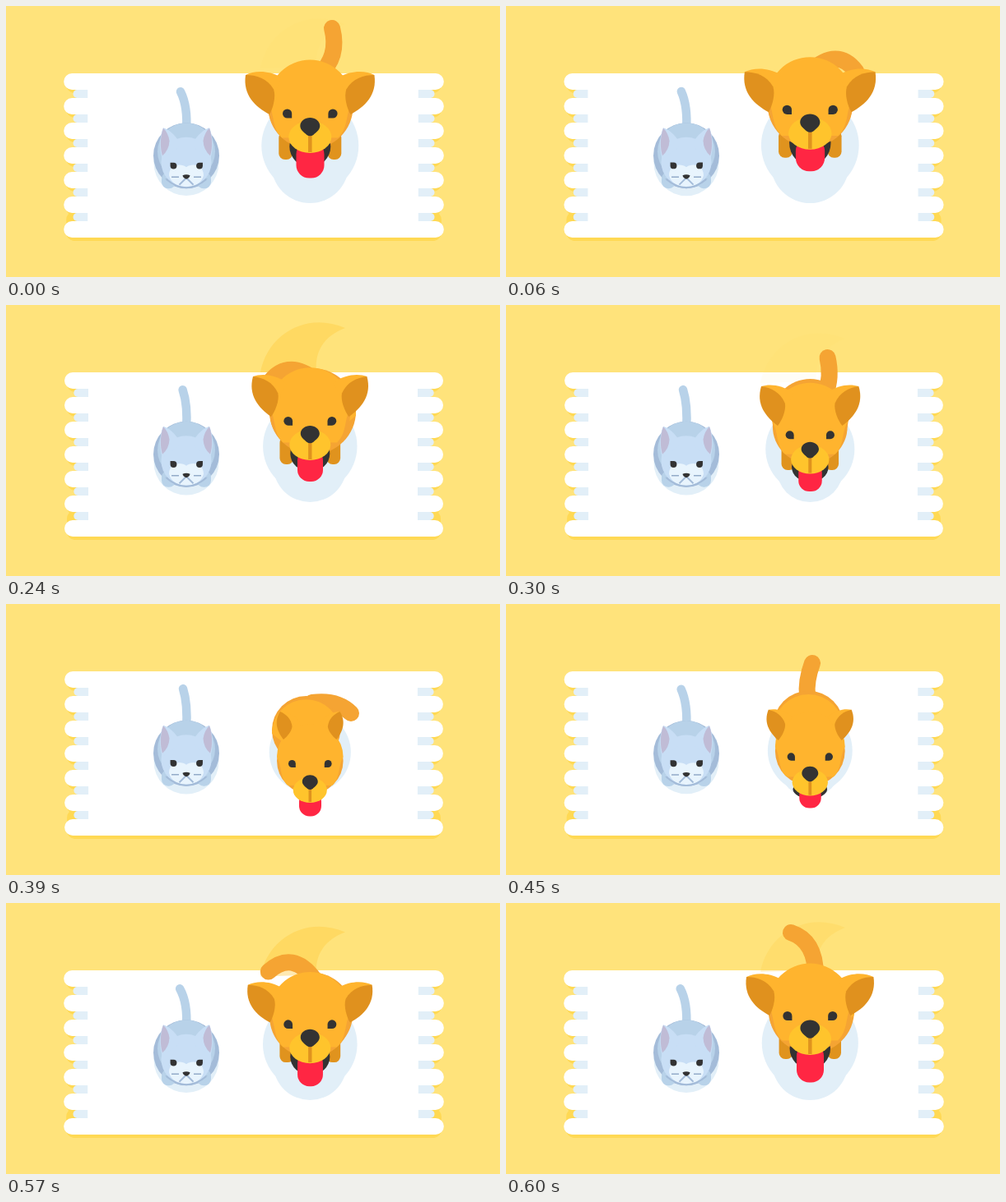
Animation, 600 px wide and 330 px high, one loop 0.63 s. Source, as an HTML page:

```html
<!DOCTYPE html>
<html lang="en">
<head>
<meta charset="utf-8">
<title>Cat and jumping dog</title>
<style>
html, body { margin: 0; width: 100%; height: 100%; overflow: hidden; background: #ffe37b; }
svg { display: block; width: 100vw; height: 100vh; }
</style>
</head>
<body>
<svg viewBox="0 0 600 330">
  <defs>
    <path id="eye" d="M-5.6 0A5.6 5.6 0 0 1 5.6 0V5.6H0A5.6 5.6 0 0 1 -5.6 0Z" fill="#333"/>
    <g id="catEar">
      <path d="M191 148C186 160 186 174 190 186L210 172 209 163C204 156 198 150 191 148Z" fill="#c8def5"/>
      <path d="M191 148.5C187 160 187 172 190 182Q198 175 198.500 164Q197 154 191 148.500Z" fill="#c0bcd6"/>
    </g>
    <path id="trail" d="M309 82C318 35 365 8 412 28C385 38 375 58 377 80Z" fill="#ffc93c"/>
    <g id="ear">
      <path d="M1 0C.98 .2 .86 .46 .55 .64L.35 .36Z" fill="#ffb42e"/>
      <path d="M1 0C.88 .2 .7 .36 .42 .36C.25 .32 .08 .14 0 0C.3 -.18 .66 -.28 1 0Z" fill="#e0911e"/>
    </g>
  </defs>

  <rect width="600" height="330" fill="#ffe37b"/>
  <g id="rug"></g>

  <circle id="catShade" cx="219" cy="192" r="39.5" fill="#e2eff8"/>
  <path id="catTail" fill="none" stroke="#b8d2e9" stroke-width="10.5" stroke-linecap="round"/>
  <g id="cat">
    <circle cx="219" cy="182" r="40" fill="#a4bcd9"/>
    <circle cx="219" cy="177" r="35" fill="#b8d2e9"/>
    <rect x="189" y="202" width="17" height="20" rx="8" fill="#b8d2e9"/>
    <rect x="232" y="202" width="17" height="20" rx="8" fill="#b8d2e9"/>
    <path d="M193 210Q219 233 245 210" fill="#a4bcd9"/>
    <circle cx="219" cy="190" r="30.500" fill="#c8def5"/>
    <use href="#catEar"/>
    <use href="#catEar" transform="translate(438) scale(-1 1)"/>
    <path d="M198 206C198 192 213 191 219 196C225 191 240 192 240 206C238 215 229 220 219 220S200 215 198 206Z" fill="#e8f4fd"/>
    <path d="M219 209L210.500 217.500M219 209L227.500 217.500" stroke="#a4bcd9" stroke-width="2"/>
    <path d="M195 211Q219 231 243 211" fill="none" stroke="#a4bcd9" stroke-width="2"/>
    <path d="M201 208H210M228 208H237" stroke="#93abc9" stroke-width="1.500"/>
    <path d="M214.500 206Q219 204 223.500 206Q223 209 219 210.500Q215 209 214.500 206Z" fill="#333"/>
    <use href="#eye" transform="translate(203.500 194.300) scale(-.7 -.7)"/>
    <use href="#eye" transform="translate(235 194.300) scale(.7 -.7)"/>
  </g>

  <g fill="#e2eff8">
    <circle id="shadeBig" cx="369.300"/>
    <circle id="shadeLow" cx="369.300"/>
  </g>
  <use id="trailL" href="#trail"/>
  <use id="trailR" href="#trail"/>
  <path id="tail" fill="none" stroke="#f5a433" stroke-width="20" stroke-linecap="round"/>
  <g fill="#e0931e">
    <rect id="legL" width="17" height="34" rx="7.500"/>
    <rect id="legR" width="17" height="34" rx="7.500"/>
  </g>
  <circle id="body" fill="#f5a433"/>
  <path id="back" fill="#ffb42e"/>
  <ellipse id="mouth" cx="369.300" fill="#333"/>
  <rect id="tongue" fill="#ff2643"/>
  <g id="head">
    <circle r="51" fill="#f5a433"/>
    <path d="M-51 -6A51 51 0 0 1 51 -6C43 8 47 26 34 38H-34C-47 26 -43 8 -51 -6Z" fill="#ffb42e"/>
  </g>
  <use id="earL" href="#ear"/>
  <g transform="translate(738.400) scale(-1 1)"><use id="earR" href="#ear"/></g>
  <g id="muzzle">
    <ellipse cy="-19.500" rx="26" ry="19.500" fill="#ffc42c"/>
    <path d="M0 -24V-1" stroke="#e0931e" stroke-width="4.500"/>
  </g>
  <use id="eyeL" href="#eye"/>
  <use id="eyeR" href="#eye"/>
  <path id="nose" d="M-12 -1C-12 -7 -6 -11 0 -11S12 -7 12 -1C12 4 7 7 4 10Q0 12.500 -4 10C-7 7 -12 4 -12 -1Z" fill="#333"/>
</svg>
<script>
const LOOP = 630, STEP = 30, MID = 369.3;

// time, body top, body x, body radius, leg bottom, rug inset, cat tail tip x
const bodyKeys = [
  [0, 71, 370, 51.5, 187, 0, 212],
  [150, 68, 369.3, 52, 184, .6, 214],
  [240, 77, 372.5, 52.5, 194, .8, 214.6],
  [300, 90, 369.5, 46.5, 201, .9, 215],
  [390, 112, 364.5, 41.5, 200, .9, 215],
  [510, 94, 371, 45.5, 201, 0, 210.5],
  [600, 79, 371, 52, 190, 0, 211.7]
];
// time, head y, scale, eye y, nose y, chin y, tongue bottom, tongue width, jaw drop
const faceKeys = [
  [0, 122.5, 1, 131, 147, 179, 209.5, 34, 17],
  [150, 119.5, 1.01, 124, 140.5, 173, 195, 36, 21],
  [240, 131, .96, 141.3, 157.5, 189, 215, 31, 14],
  [300, 148, .89, 158.3, 176.5, 205.5, 227, 28.5, 10],
  [390, 191, .79, 194.5, 217, 242, 258.5, 27, 0],
  [510, 157, .9, 168, 186.5, 215.5, 232, 27, 9],
  [600, 130, .99, 137.5, 153.5, 185, 218.5, 33, 17]
];
// time, left ear tip x y, root x y
const earKeys = [
  [0, 291, 84, 320, 132],
  [150, 290, 78, 318, 128],
  [240, 300, 87, 322, 136],
  [300, 310, 99, 330, 147],
  [390, 333, 131, 337, 165],
  [510, 300, 118, 323, 161],
  [600, 292, 90, 320, 137]
];
// time, tail root x y, bend x y, tip x y
const tailKeys = [
  [0, 380, 84, 405, 62, 396, 27],
  [75, 366, 80, 400, 46, 426, 84],
  [112, 366, 78, 386, 50, 388, 19],
  [150, 362, 82, 338, 58, 346, 30],
  [195, 364, 82, 326, 58, 306, 60],
  [240, 376, 92, 340, 62, 316, 100],
  [270, 384, 98, 366, 70, 342, 64],
  [300, 388, 108, 396, 88, 390.5, 64],
  [345, 382, 112, 412, 98, 422, 86],
  [390, 372, 120, 402, 116, 419, 133],
  [450, 366, 112, 364, 94, 372, 72],
  [510, 352, 110, 330, 98, 323, 79],
  [555, 372, 96, 338, 66, 312, 100],
  [600, 376, 88, 376, 46, 346, 36]
];

const $ = id => document.getElementById(id);
const set = (id, attrs) => {
  for (const k in attrs) $(id).setAttribute(k, attrs[k]);
};

// Smooth cyclic interpolation through the rows of a key table.
function sample(keys, t) {
  const n = keys.length;
  const row = i => keys[(i + n) % n];
  const time = i => row(i)[0] + Math.floor(i / n) * LOOP;
  let i = n - 1;
  while (keys[i][0] > t) i--;
  const t0 = time(i - 1), t1 = time(i), t2 = time(i + 1), t3 = time(i + 2);
  const h = t2 - t1, u = (t - t1) / h, v = 1 - u;
  return row(i).slice(1).map((b, j) => {
    const a = row(i - 1)[j + 1], c = row(i + 1)[j + 1], d = row(i + 2)[j + 1];
    const m1 = (c - a) / (t2 - t0) * h, m2 = (d - b) / (t3 - t1) * h;
    return b * (1 + 2 * u) * v * v + m1 * u * v * v + c * u * u * (3 - 2 * u) - m2 * u * u * v;
  });
}

// Quick rise to 1 at the peak, then a fade.
function pulse(t, peak) {
  const d = (t - peak + 30 + LOOP) % LOOP - 30;
  return d < 0 ? 1 + d / 30 : Math.max(0, 1 - d / 68);
}

function rug(inset) {
  const x = 70.2 + inset, w = 461.6 - 2 * inset;
  let shade = `<rect x="${x + 3}" y="250" width="${w - 6}" height="36" rx="10" fill="#ffd954"/>`;
  let tabs = "", bars = "";
  for (let i = 0; i < 7; i++) {
    const y = 82 + 30 * i;
    shade += `<rect x="${x + 3}" y="${y + 4}" width="${w - 6}" height="20" rx="10" fill="#ffd954"/>`;
    bars += `<rect x="${x}" y="${y}" width="${w}" height="20" rx="10"/>`;
    if (i < 6) tabs += `<rect x="${x + 11.3}" y="${y + 20}" width="${w - 22.6}" height="10" rx="5" fill="#e2eff8"/>`;
  }
  $("rug").innerHTML = shade + tabs +
    `<g fill="#fff">${bars}<rect x="${99.2 + inset}" y="82" width="${401.6 - 2 * inset}" height="200"/></g>`;
}

function draw(t) {
  const [top, bx, r, leg, inset, tipX] = sample(bodyKeys, t);
  const [hy, s, eyeY, noseY, chin, lick, lickW, jaw] = sample(faceKeys, t);
  const [ex, ey, rx, ry] = sample(earKeys, t);
  const [ax, ay, cx, cy, px, py] = sample(tailKeys, t);

  rug(inset);
  set("cat", { transform: `translate(0 ${.3 - .7 * inset})` });
  set("catShade", { cy: 191.5 + .6 * inset });
  set("catTail", { d: `M219 152Q221 122 ${tipX} ${104.3 - 1.3 * inset}` });

  const far = 1 - s, low = 47 - 60 * far;
  set("shadeBig", { cy: 170 + 50 * far, r: 59 - 45 * far });
  set("shadeLow", { cy: 240 - 100 * Math.max(0, .88 - s) - low, r: low });

  set("trailL", {
    transform: `translate(0 ${top - 77})`,
    opacity: .4 * Math.max(pulse(t, 240), pulse(t, 570))
  });
  set("trailR", {
    transform: `translate(749 ${top - 77}) scale(-1 1)`,
    opacity: .4 * pulse(t, 90)
  });
  set("tail", { d: `M${ax} ${ay}Q${cx} ${cy} ${px} ${py}` });

  set("legL", { x: MID - 29.5 * s - 8.5, y: leg - 34 });
  set("legR", { x: MID + 29.5 * s - 8.5, y: leg - 34 });
  const by = top + r, rim = by + r * .1;
  set("body", { cx: bx, cy: by, r });
  set("back", { d: `M${bx - r} ${rim}A${r} ${r} 0 0 1 ${bx + r} ${rim}Q${bx} ${by + r} ${bx - r} ${rim}Z` });

  const drop = Math.max(0, jaw);
  set("mouth", { cy: chin - 8, rx: 25 * s, ry: drop ? 8 + drop : 0 });
  set("tongue", {
    x: MID + .2 - lickW / 2, y: chin - 14, width: lickW,
    height: Math.max(0, lick - chin + 14), rx: lickW * .46
  });
  set("head", { transform: `translate(${MID} ${hy}) scale(${s})` });
  set("muzzle", { transform: `translate(${MID} ${chin}) scale(${s})` });
  set("nose", { transform: `translate(${MID} ${noseY}) scale(${s})` });

  const open = Math.min(1, Math.max(0, (Math.abs(t - 150) - 25) / 30));
  const gap = 27.7 * s;
  set("eyeL", { transform: `translate(${MID - gap} ${eyeY}) scale(${s} ${s * open})` });
  set("eyeR", { transform: `translate(${MID + gap} ${eyeY}) scale(${-s} ${s * open})` });

  const dx = ex - rx, dy = ey - ry;
  const turn = `matrix(${dx} ${dy} ${-dy} ${dx} ${rx} ${ry})`;
  set("earL", { transform: turn });
  set("earR", { transform: turn });
}

const start = performance.now();
function tick() {
  const t = (performance.now() - start) % LOOP;
  draw(Math.floor(t / STEP) * STEP);
  requestAnimationFrame(tick);
}
tick();
</script>
</body>
</html>
```
